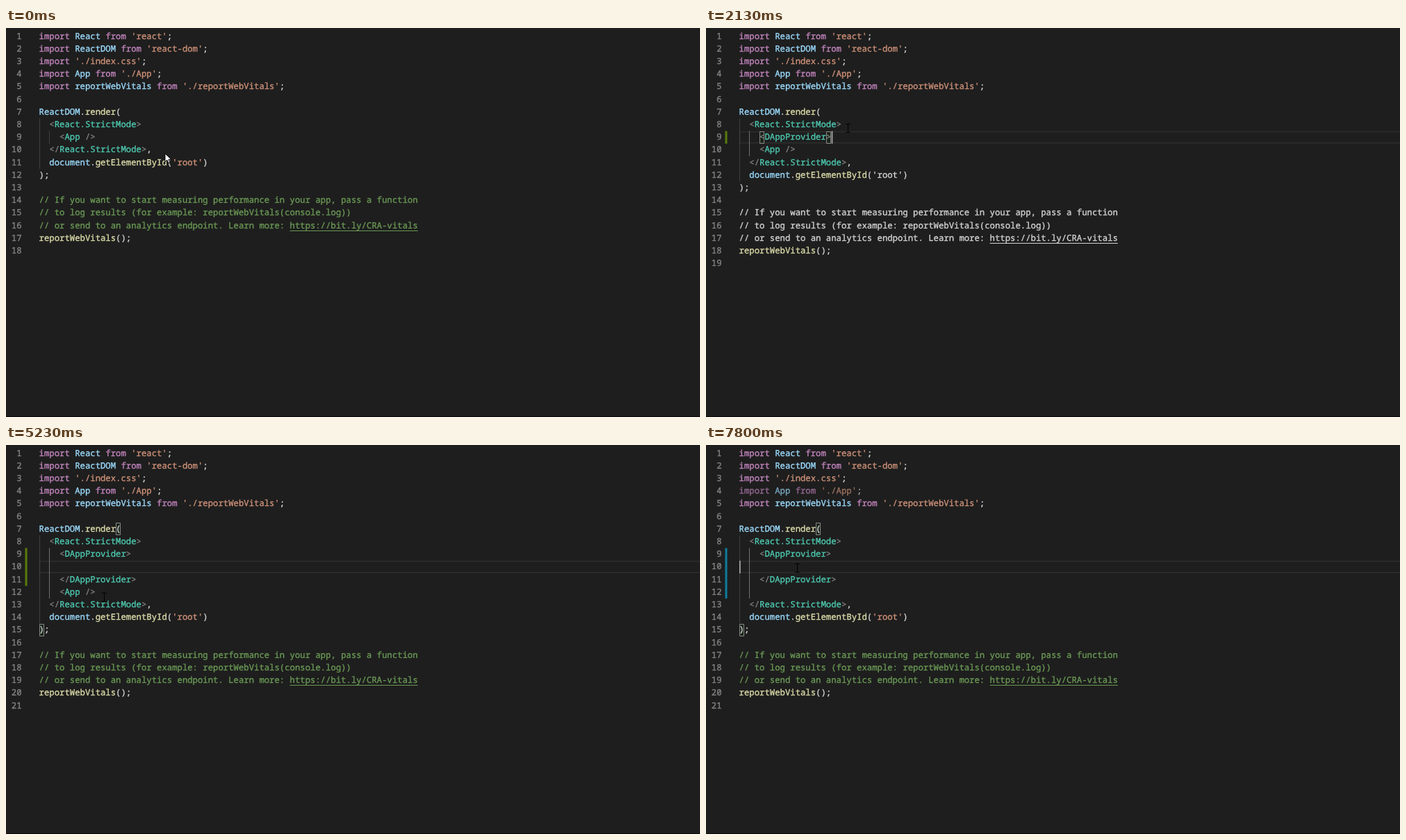
An HTML page with a canvas that plays this animation: 999x561 px, repeating every 8000 ms.

```html
<!DOCTYPE html>
<html lang="en">
<head>
<meta charset="utf-8">
<title>Code editor</title>
<style>
  html, body { margin: 0; width: 100%; height: 100%; overflow: hidden; background: #1e1e1e; }
  canvas { display: block; }
</style>
</head>
<body>
<canvas id="stage" width="999" height="561"></canvas>
<script>
const ctx = document.getElementById('stage').getContext('2d');
const LOOP = 8000, LEFT = 47.6, TOP = 3, LINE = 18.2, CHAR = 7.367, BASELINE = 13;
const PLAIN = '#d4d4d4';
const COLORS = {
  k: '#c586c0', v: '#9cdcfe', s: '#ce9178', f: '#dcdcaa', p: PLAIN,
  t: '#4ec9b0', b: '#808080', c: '#6a9955', u: '#6a9955'
};
const ADDED = '#587c0c', MODIFIED = '#0c7d9d';

// Each token is a colour key followed by its text; tokens are separated by "|".
const HEAD = [
  "kimport |vReact |kfrom |s'react'|p;",
  "kimport |vReactDOM |kfrom |s'react-dom'|p;",
  "kimport |s'./index.css'|p;",
  "kimport |vApp |kfrom |s'./App'|p;",
  "kimport |vreportWebVitals |kfrom |s'./reportWebVitals'|p;",
  "",
  "vReactDOM|p.|frender|p(",
  "b  <|tReact.StrictMode|b>"
];
const TAIL = [
  "b  </|tReact.StrictMode|b>|p,",
  "v  document|p.|fgetElementById|p(|s'root'|p)",
  "p);",
  "",
  "c// If you want to start measuring performance in your app, pass a function",
  "c// to log results (for example: reportWebVitals(console.log))",
  "c// or send to an analytics endpoint. Learn more: |uhttps://bit.ly/CRA-vitals",
  "freportWebVitals|p();",
  ""
];
const APP = "b    <|tApp |b/>";
const OPEN = "b    <|tDAppProvider|b>";
const CLOSE = "b</|tDAppProvider|b>";
const BODY = {
  start: [APP],
  blank: ["", APP],
  open: [OPEN, APP],
  pair: [OPEN + "|" + CLOSE, APP],
  split: [OPEN, "", "b    |" + CLOSE, APP],
  cut: [OPEN, "", "b    |" + CLOSE, ""]
};

// Editor changes: [time, changed properties]; positions are [line, column].
const STEPS = [
  [0, { body: 'start', caret: null, on: false, brackets: [], gutter: null,
        selectFrom: null, matches: [], bulb: false, faded: false }],
  [1030, { caret: [8, 20], on: true }],
  [1060, { brackets: [[8, 2], [8, 19]] }],
  [1300, { on: false }],
  [1530, { body: 'blank', caret: [9, 4], on: true }],
  [1660, { brackets: [[7, 15], [13, 0]] }],
  [1800, { gutter: [9, 9, ADDED] }],
  [2030, { body: 'open', caret: [9, 18] }],
  [2130, { brackets: [[9, 4], [9, 17]] }],
  [2200, { body: 'pair' }],
  [2230, { brackets: [[9, 18], [9, 32]] }],
  [2400, { on: false }],
  [3060, { on: true }],
  [3560, { on: false }],
  [4060, { on: true }],
  [4300, { body: 'split', caret: [10, 6], brackets: [[11, 4], [11, 18]] }],
  [4400, { brackets: [[7, 15], [15, 0]] }],
  [4530, { gutter: [9, 11, ADDED] }],
  [4830, { on: false }],
  [5330, { on: true }],
  [5530, { caret: [12, 11] }],
  [5600, { brackets: [[12, 4], [12, 10]] }],
  [5700, { selectFrom: 10, caret: [12, 10], brackets: [],
           matches: [[8, 19], [9, 17], [11, 18], [13, 20]] }],
  [5760, { selectFrom: 7, caret: [12, 7], matches: [] }],
  [5830, { selectFrom: 4, caret: [12, 4] }],
  [6200, { bulb: true }],
  [6630, { body: 'cut', selectFrom: null, bulb: false }],
  [6730, { brackets: [[7, 15], [15, 0]] }],
  [6900, { gutter: [9, 12, MODIFIED] }],
  [7130, { on: false }],
  [7460, { faded: true }],
  [7560, { on: true }],
  [7800, { caret: [10, 0] }]
];

// Text pointer: [time, x, y]; each run is visible from its first to its last time.
const POINTER_RUNS = [
  [[160, 229, 181], [520, 198, 152], [800, 204, 143.5], [2530, 204, 143.5],
   [2760, 220, 146.5], [3200, 220, 146.5], [3400, 184, 155], [3700, 182.5, 156.5], [3900, 182.5, 156.5]],
  [[4830, 183, 157], [5230, 141, 219], [5560, 129, 212], [5670, 128, 212], [5860, 75, 210],
   [5970, 75, 210], [6060, 77, 212], [6700, 77, 212], [7430, 131, 177], [LOOP, 131, 177]]
];

const xAt = col => LEFT + col * CHAR;
const yAt = line => TOP + (line - 1) * LINE;
const baselineAt = line => Math.floor(yAt(line) + BASELINE);

function box(x, y, w, h, color) {
  ctx.fillStyle = color;
  ctx.fillRect(x, y, w, h);
}

// Characters sit on the monospace grid; a hairline stroke gives them a sturdier weight.
function drawText(text, x, y, color) {
  ctx.fillStyle = ctx.strokeStyle = color;
  ctx.lineWidth = .35;
  [...text].forEach((char, i) => {
    if (char === ' ') return;
    ctx.fillText(char, x + i * CHAR, y);
    ctx.strokeText(char, x + i * CHAR, y);
  });
}

function drawCode(markup, line, broken) {
  let col = 0;
  for (const token of markup.split('|')) {
    const key = token[0], text = token.slice(1);
    const color = broken && 'csu'.includes(key) ? PLAIN : COLORS[key];
    drawText(text, xAt(col), baselineAt(line), color);
    if (key === 'u') box(xAt(col), baselineAt(line) + 3, text.length * CHAR, 1, color);
    col += text.length;
  }
}

function drawGuide(col, first, last, color) {
  box(Math.round(xAt(col)), yAt(first), 1, (last - first + 1) * LINE, color);
}

function drawBulb(x, y) {
  ctx.fillStyle = '#ffcc00';
  ctx.beginPath();
  ctx.arc(x, y - 2, 4.7, 0, 7);
  ctx.fill();
  box(x - 2.5, y + 1, 5, 5.5, '#ffcc00');
  box(x - 2.5, y + 3.5, 5, 1, '#1e1e1e');
}

function drawArrow(x, y) {
  const arrow = new Path2D(`M${x} ${y}v12l3-2.5 2 4.5 2-1-2-4.3h4z`);
  ctx.lineWidth = 1;
  ctx.strokeStyle = '#000';
  ctx.fillStyle = '#fff';
  ctx.fill(arrow);
  ctx.stroke(arrow);
}

function drawIBeam(x, y) {
  x = Math.round(x);
  y = Math.round(y);
  box(x, y - 6, 1, 13, '#000');
  for (const end of [y - 6, y + 6]) {
    box(x - 3, end, 3, 1, '#000');
    box(x + 1, end, 3, 1, '#000');
  }
}

function drawPointer(time) {
  if (time < 160) return drawArrow(229, 181);
  for (const run of POINTER_RUNS) {
    const next = run.findIndex(point => point[0] > time);
    if (next < 1) continue;
    const [t0, x0, y0] = run[next - 1], [t1, x1, y1] = run[next];
    const p = (time - t0) / (t1 - t0), ease = p * p * (3 - 2 * p);
    drawIBeam(x0 + (x1 - x0) * ease, y0 + (y1 - y0) * ease);
  }
}

function draw(time) {
  const state = Object.assign({}, ...STEPS.filter(([at]) => at <= time).map(([, change]) => change));
  const { caret, selectFrom } = state;
  const body = BODY[state.body], selecting = selectFrom !== null;

  box(0, 0, 999, 561, '#1e1e1e');
  box(0, 560, 999, 1, '#0a0a0a');
  ctx.font = '12.28px "Noto Sans Mono", monospace';
  ctx.textRendering = 'geometricPrecision';
  ctx.lineJoin = 'round';

  if (caret && !selecting) {
    ctx.strokeStyle = '#2b2b2b';
    ctx.lineWidth = 1.9;
    ctx.strokeRect(48.5, yAt(caret[0]) + 1, 960, LINE - 2);
  }
  if (selecting) box(xAt(selectFrom), yAt(12), (11 - selectFrom) * CHAR, LINE, '#264f78');
  for (const [line, col] of state.matches)
    box(xAt(col), yAt(line), CHAR, LINE, 'rgba(173,214,255,.15)');

  drawGuide(0, 8, 10 + body.length, '#404040');
  drawGuide(2, 9, 8 + body.length, caret && !selecting ? '#707070' : '#404040');
  if (state.gutter) {
    const [first, last, color] = state.gutter;
    box(27.5, yAt(first), 3, (last - first + 1) * LINE, color);
  }

  for (const [line, col] of state.brackets) {
    const x = Math.round(xAt(col)), y = Math.round(yAt(line));
    box(x, y, 7, 18, 'rgba(0,100,0,.1)');
    ctx.strokeStyle = '#888';
    ctx.lineWidth = 1;
    ctx.strokeRect(x + .5, y + .5, 6, 17);
  }

  [...HEAD, ...body, ...TAIL].forEach((markup, i) => {
    const line = i + 1, number = String(line);
    drawText(number, 22.5 - number.length * CHAR, baselineAt(line), '#858585');
    ctx.globalAlpha = state.faded && line === 4 ? .667 : 1;
    drawCode(markup, line, state.body === 'open' && i >= HEAD.length);
    ctx.globalAlpha = 1;
  });

  if (selecting && selectFrom <= 8) box(xAt(8.4), yAt(12) + 9, 1.5, 1.5, '#7f92a5');
  if (state.bulb) drawBulb(55.6, 210.2);
  if (caret && state.on) box(xAt(caret[1]) + .5, yAt(caret[0]), 1.6, LINE, '#aeafad');
  drawPointer(time);
}

function tick() {
  draw(performance.now() % LOOP);
  requestAnimationFrame(tick);
}
tick();
</script>
</body>
</html>
```
